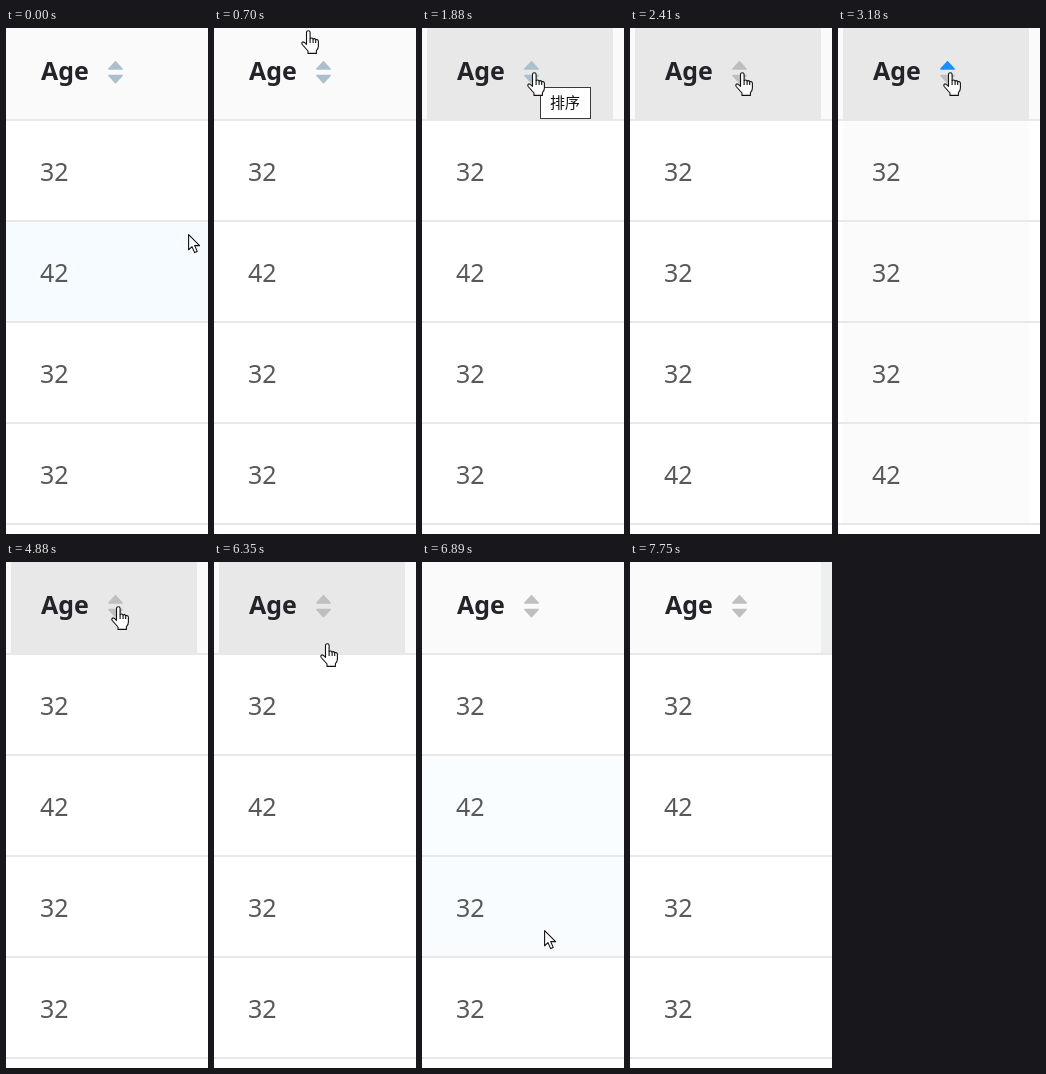
Write an HTML page that moves like this. It is 202x506 px and loops after 8000 ms.

```html
<!DOCTYPE html>
<html lang="en">
<head>
<meta charset="utf-8">
<title>Sortable column</title>
<style>
  html, body { margin: 0; width: 100%; height: 100%; overflow: hidden; background: #fff; }
  svg { display: block; width: 202px; height: 506px; }
  text { font-family: "Noto Sans", "Open Sans", sans-serif; font-size: 25px; }
  .title { font-weight: 600; fill: #232329; }
  .values text { fill: #595959; }
  .tip text { font: 15px "Noto Sans CJK SC", "Noto Sans CJK", sans-serif; fill: #111; }
  .pointer { fill: #fff; stroke: #111; stroke-width: 1.1; stroke-linejoin: round; }

  .head, .next, .sorted, .row, .first, .tip, .up, .down { animation: 8s linear infinite; }
  .plain, .asc, .desc, .hand, .arrow { animation: 8s step-end infinite; }

  /* Header and column shading */
  .head { animation-name: head; }
  @keyframes head {
    0%, 9.6% { opacity: 0; }
    12.5%, 80.3% { opacity: 1; }
    84%, 100% { opacity: 0; }
  }
  .next { animation-name: next; }
  @keyframes next {
    0%, 93.5% { opacity: 0; }
    96.8%, 100% { opacity: 1; }
  }
  .sorted { animation-name: sorted; }
  @keyframes sorted {
    0%, 30% { opacity: 0; }
    33%, 58.1% { opacity: 1; }
    61%, 100% { opacity: 0; }
  }

  /* Row hover */
  .first { animation-name: first; }
  @keyframes first {
    0%, .8% { opacity: 1; }
    4%, 100% { opacity: 0; }
  }
  .row { animation-name: row; animation-delay: calc(var(--i) * 175ms - 8s); }
  @keyframes row {
    0%, 80.3% { opacity: 0; }
    82.5% { opacity: 1; }
    86%, 100% { opacity: 0; }
  }

  /* Values in each sort order */
  .plain { animation-name: plain; }
  @keyframes plain {
    0% { opacity: 1; }
    30.1% { opacity: 0; }
    58.1%, 100% { opacity: 1; }
  }
  .asc { animation-name: asc; }
  @keyframes asc {
    0% { opacity: 0; }
    30.1% { opacity: 1; }
    40.6%, 100% { opacity: 0; }
  }
  .desc { animation-name: desc; }
  @keyframes desc {
    0% { opacity: 0; }
    40.6% { opacity: 1; }
    58.1%, 100% { opacity: 0; }
  }

  /* Sort arrows */
  .up, .down { stroke-width: 1.4; stroke-linejoin: round; }
  .up { animation-name: up; }
  @keyframes up {
    0%, 26.3% { fill: #abc0cc; stroke: #abc0cc; }
    28.2%, 30.1% { fill: #bfbfbf; stroke: #bfbfbf; }
    33.1%, 40.6% { fill: #1890ff; stroke: #1890ff; }
    45.5%, 56.15% { fill: #8fa0b0; stroke: #8fa0b0; }
    56.2%, 58.1% { fill: #8e8e8e; stroke: #8e8e8e; }
    61%, 100% { fill: #bfbfbf; stroke: #bfbfbf; }
  }
  .down { animation-name: down; }
  @keyframes down {
    0%, 26.3% { fill: #abc0cc; stroke: #abc0cc; }
    28.2%, 40.6% { fill: #bfbfbf; stroke: #bfbfbf; }
    45.5%, 58.1% { fill: #1890ff; stroke: #1890ff; }
    61%, 100% { fill: #bfbfbf; stroke: #bfbfbf; }
  }

  .tip { animation-name: tip; }
  @keyframes tip {
    0%, 17.3% { opacity: 0; }
    17.35%, 26.3% { opacity: 1; }
    28.2%, 100% { opacity: 0; }
  }

  /* Pointer */
  .hand { animation-name: hand; }
  @keyframes hand {
    0% { transform: translate(-99px, 0); }
    2.4% { transform: translate(122px, 62px); }
    3.2% { transform: translate(104px, 15px); }
    3.95% { transform: translate(-99px, 0); }
    6.85% { transform: translate(84px, -12px); }
    7.8% { transform: translate(86px, -6px); }
    8.7% { transform: translate(87px, 2px); }
    9.7% { transform: translate(92px, 13px); }
    10.6% { transform: translate(98px, 28px); }
    11.6% { transform: translate(103px, 39px); }
    14.45% { transform: translate(103px, 44px); }
    21.35% { transform: translate(104px, 44px); }
    23.45% { transform: translate(105px, 44px); }
    79.3% { transform: translate(106px, 81px); }
    80.35%, 100% { transform: translate(-99px, 0); }
  }
  .arrow { animation-name: arrow; }
  @keyframes arrow {
    0% { transform: translate(182px, 206px); }
    .85% { transform: translate(172px, 172px); }
    1.6% { transform: translate(152px, 122px); }
    2.4% { transform: translate(-99px, 0); }
    80.35% { transform: translate(109px, 112px); }
    81.3% { transform: translate(112px, 150px); }
    82.3% { transform: translate(114px, 190px); }
    83.2% { transform: translate(116px, 232px); }
    84.2% { transform: translate(118px, 276px); }
    85.1% { transform: translate(120px, 322px); }
    86.1% { transform: translate(122px, 368px); }
    87.1% { transform: translate(124px, 424px); }
    88% { transform: translate(126px, 490px); }
    88.95%, 100% { transform: translate(-99px, 0); }
  }
</style>
</head>
<body>
<svg viewBox="0 0 202 506">
  <rect width="202" height="92" fill="#fafafa"/>
  <rect class="head" x="5" width="186" height="92" fill="#e8e8e8"/>
  <rect class="next" x="191" width="11" height="92" fill="#eef0f0"/>

  <rect class="sorted" x="5" y="93" width="186" height="403" fill="#fbfbfb"/>
  <g fill="#f5fbff">
    <rect class="first" y="194" width="202" height="99"/>
    <rect class="row" style="--i:0" y="93" width="202" height="99"/>
    <rect class="row" style="--i:1" y="194" width="202" height="99"/>
    <rect class="row" style="--i:2" y="295" width="202" height="99"/>
    <rect class="row" style="--i:3" y="396" width="202" height="99"/>
  </g>
  <path d="M0 92H202M0 193H202M0 294H202M0 395H202M0 496H202" stroke="#e8e8e8" stroke-width="2"/>

  <text class="title" x="35" y="52">Age</text>
  <path class="up" d="M109.5 33.7L116.2 41H102.8Z"/>
  <path class="down" d="M109.5 54.8L116.2 47.5H102.8Z"/>

  <g class="values">
    <g class="plain">
      <text x="34" y="153">32</text><text x="34" y="254">42</text>
      <text x="34" y="355">32</text><text x="34" y="456">32</text>
    </g>
    <g class="asc">
      <text x="34" y="153">32</text><text x="34" y="254">32</text>
      <text x="34" y="355">32</text><text x="34" y="456">42</text>
    </g>
    <g class="desc">
      <text x="34" y="153">42</text><text x="34" y="254">32</text>
      <text x="34" y="355">32</text><text x="34" y="456">32</text>
    </g>
  </g>

  <g class="tip">
    <rect x="118.5" y="59.5" width="50" height="31" fill="#fff" stroke="#3a3a3a"/>
    <text x="128" y="80">排序</text>
  </g>

  <g class="pointer">
    <g class="hand">
      <path d="M5.5 14V2.5a1.8 1.8 0 0 1 3.6 0V8.5q1.6-1.2 3 .4q1.7-.9 2.6.7q2.4-.6 2.7 1.6V16q0 3-2 4.6V23.4H7V21L1.2 14.5q-1-2 .6-2.6q1.4-.3 3.7 2.4z"/>
      <path d="M9.1 8.5V13M12.1 9V13M14.7 9.6V13" fill="none"/>
    </g>
    <path class="arrow" d="M.6.6V15.8L4 12.6L6.6 18.6L9.2 17.4L6.7 11.6H11.6Z"/>
  </g>
</svg>
</body>
</html>
```
